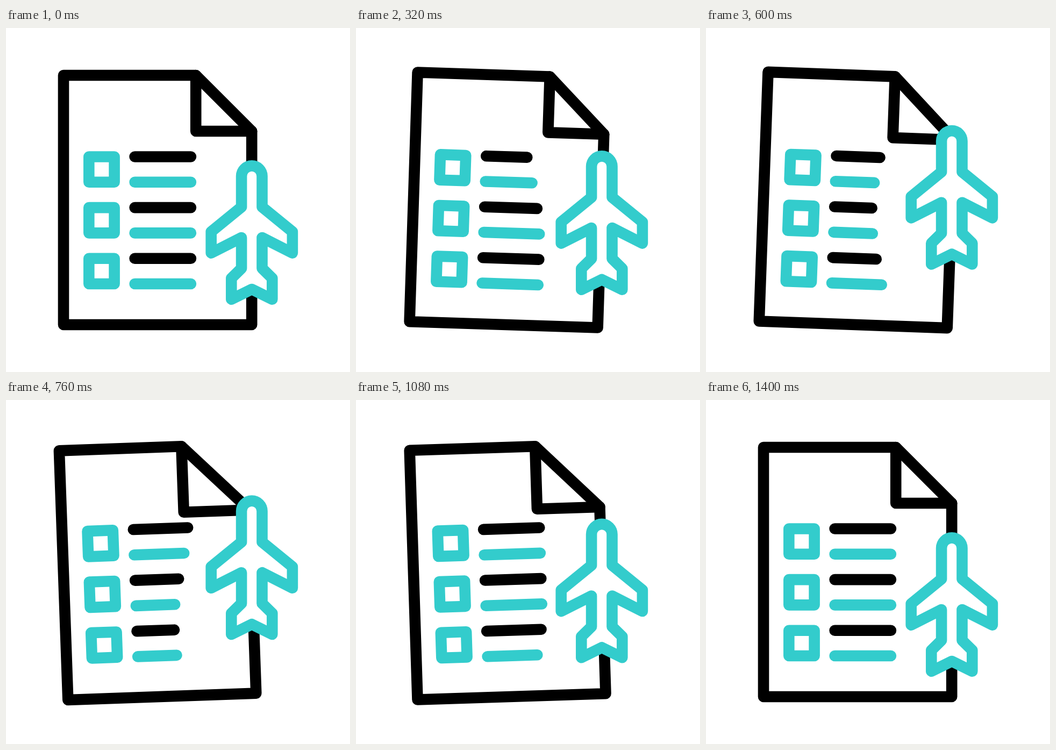
Recreate the animation shown at these times as an HTML page with a canvas. Size 640x640 px, loop 1600 ms.

```html
<!DOCTYPE html>
<html lang="en">
<head>
<meta charset="utf-8">
<title>Travel checklist</title>
<style>
  html, body { margin: 0; width: 100%; height: 100%; overflow: hidden; background: #fff; }
  canvas { display: block; }
</style>
</head>
<body>
<canvas id="stage" width="640" height="640"></canvas>
<script>
const ctx = document.getElementById('stage').getContext('2d');
const LOOP = 1600;
const STEP = 40;
const BLACK = '#000';
const TEAL = '#33cccc';
const ROW = 47.3;

// Symmetric cubic bezier (p, 0, 1 - p, 1), solved by bisection.
function ease(x, p) {
  if (x <= 0) return 0;
  if (x >= 1) return 1;
  let low = 0, high = 1, u = 0.5;
  for (let i = 0; i < 24; i++) {
    u = (low + high) / 2;
    const v = 1 - u;
    const guess = 3 * p * u * v * v + 3 * (1 - p) * u * u * v + u * u * u;
    if (guess < x) low = u; else high = u;
  }
  return u * u * (3 - 2 * u);
}

// Keys are [time, value] pairs.
function track(t, keys, p) {
  let value = keys[0][1];
  for (let i = 1; i < keys.length; i++) {
    const [start, from] = keys[i - 1];
    const [end, to] = keys[i];
    value += (to - from) * ease((t - start) / (end - start), p);
  }
  return value;
}

function stroke(points, color, closed) {
  ctx.beginPath();
  points.forEach(([x, y]) => ctx.lineTo(x, y));
  if (closed) ctx.closePath();
  ctx.strokeStyle = color;
  ctx.stroke();
}

function drawPaper(t) {
  const angle = track(t, [[114, 0], [482, 3], [880, -3], [1330, 0]], 0.5);
  const fold = track(t, [[350, 0], [855, 20], [1385, 0]], 0.42);
  const foldX = 353.2 - fold, foldY = 192 + fold;

  ctx.save();
  ctx.translate(282, 320);
  ctx.rotate(angle * Math.PI / 180);
  ctx.translate(-282, -320);

  stroke([[107, 88], [foldX, 88], [457.2, foldY], [457.2, 552], [107, 552]], BLACK, true);
  stroke([[foldX, 88], [foldX, foldY], [457.2, foldY]], BLACK);

  for (let i = 0; i < 3; i++) {
    const y = 239.5 + i * 2 * ROW;
    stroke([[154.3, y], [201.6, y], [201.6, y + ROW], [154.3, y + ROW]], TEAL, true);
  }
  for (let i = 0; i < 6; i++) {
    const y = 239.5 + i * ROW;
    const cut = track(t - i * 80, [[40, 0], [440, 34.7], [840, 0]], 0.42);
    stroke([[239.6, y], [343.9 - cut, y]], i % 2 ? TEAL : BLACK);
  }
  ctx.restore();
}

function drawPlane(t) {
  // Right half as offsets from the centre line, nose to tail.
  const side = [[19.2, 333], [75.6, 379], [75.6, 418.6], [19.2, 390],
                [19.2, 447.2], [38, 465.6], [38, 504.7]];
  ctx.save();
  ctx.translate(457.3, track(t, [[84, 0], [720, -69.2], [1355, 0]], 0.5));
  ctx.beginPath();
  ctx.arc(0, 275.6, 19.2, Math.PI, 0);
  side.forEach(([x, y]) => ctx.lineTo(x, y));
  ctx.lineTo(0, 486);
  side.reverse().forEach(([x, y]) => ctx.lineTo(-x, y));
  ctx.closePath();
  ctx.fillStyle = '#fff';
  ctx.fill();
  ctx.strokeStyle = TEAL;
  ctx.stroke();
  ctx.restore();
}

function draw(now) {
  const t = Math.floor((now % LOOP) / STEP) * STEP;
  ctx.fillStyle = '#fff';
  ctx.fillRect(0, 0, 640, 640);
  ctx.lineWidth = 20.6;
  ctx.lineCap = ctx.lineJoin = 'round';
  drawPaper(t);
  drawPlane(t);
}

let origin = null;
function frame(now) {
  if (origin === null) origin = now;
  draw(now - origin);
  requestAnimationFrame(frame);
}
draw(0);
requestAnimationFrame(frame);
</script>
</body>
</html>
```
